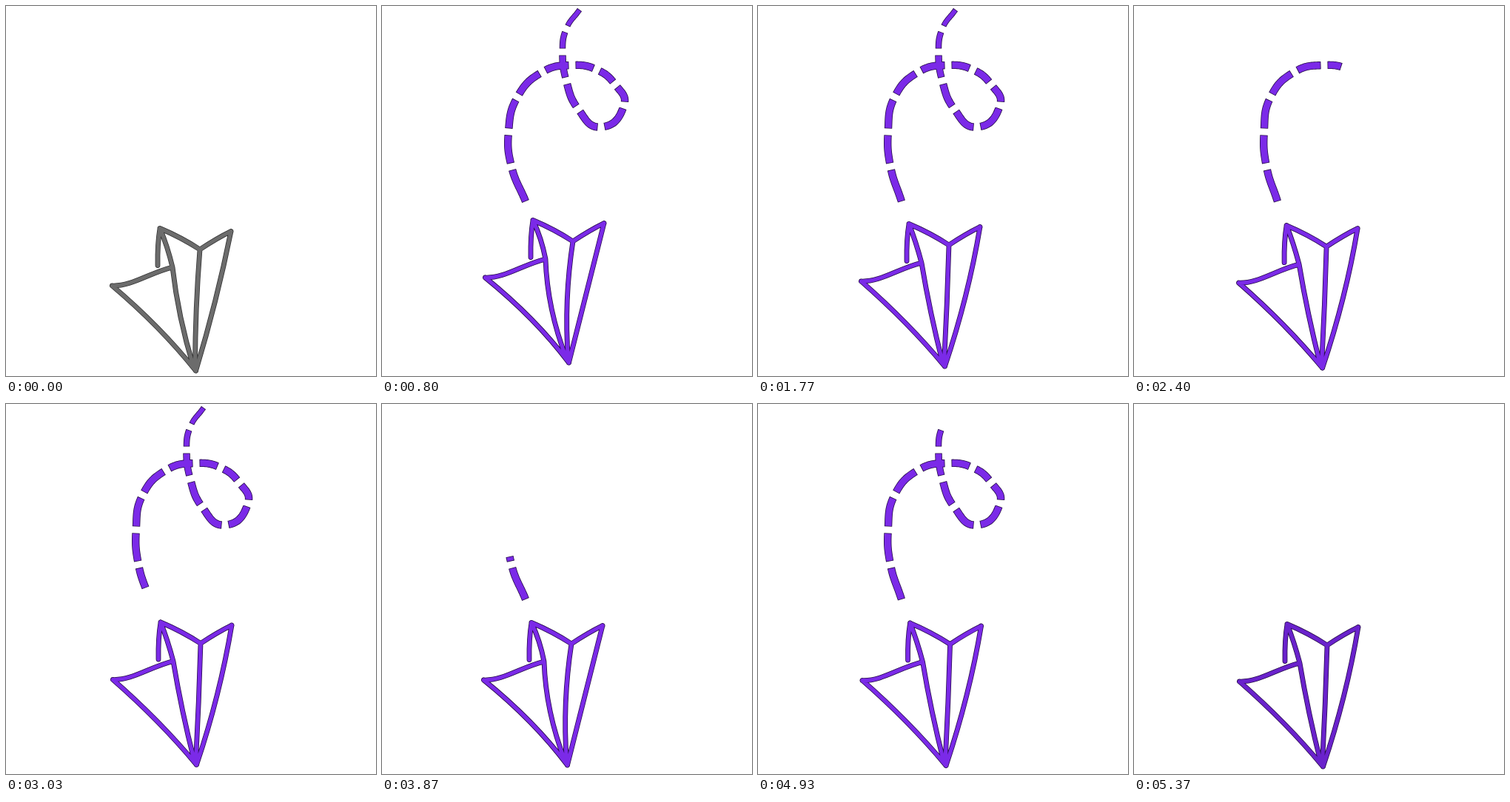
Write an HTML page with a canvas that moves like this. It is 500 px wide and 500 px high and loops after 5410 ms.

```html
<!DOCTYPE html>
<html lang="en">
<head>
<meta charset="utf-8">
<title>Paper plane</title>
<style>
html, body { margin: 0; height: 100%; overflow: hidden; background: #fff; }
canvas { display: block; width: 100vw; height: 100vh; object-fit: contain; }
</style>
</head>
<body>
<canvas id="stage" width="500" height="500"></canvas>
<script>
const ctx = document.getElementById('stage').getContext('2d');
const LOOP = 5410, CYCLE = 81, GAP = 9;
const PURPLE = '#7b2ae8', DIM = '#6a22cc', GREY = '#6c6c6c';

// Drift of the plane: frame, dx, dy, bend of its lines
const drift = [
  [0, 0, 0, .4], [10, 1, -5.5, 0], [24, -4, -11, 1],
  [35, -6, -5, 1], [53, -4, -6, 0], [80, -1, -3, 0], [CYCLE, 0, 0, .4]
];

const fold = [208, 300.5], flap = [205, 350.5], notch = [262, 329], right = [304, 304.5],
  nose = [256.5, 493], left = [143.5, 378], joint = [225, 353];

// The trail bends through these points; each inner one is the middle of a gap
const knots = [
  [267, 5], [249, 31], [244, 62], [249, 101], [265, 139], [296, 163.5], [327, 134], [315, 106],
  [290, 86], [257, 80], [217, 89], [183, 123], [171, 170], [175, 217], [194, 264]
];

const clamp = (x, lo = 0, hi = 1) => Math.min(hi, Math.max(lo, x));
const dist = (p, q) => Math.hypot(q[0] - p[0], q[1] - p[1]);

function driftAt(frame) {
  const i = drift.findIndex(d => d[0] > frame), a = drift[i - 1], b = drift[i];
  const u = (frame - a[0]) / (b[0] - a[0]);
  return a.map((v, j) => v + (b[j] - v) * u);
}

const edge = color => color === GREY ? '#333' : '#260c4a';

function stroke(path, width, color) {
  ctx.lineWidth = width;
  ctx.strokeStyle = color;
  ctx.stroke(path);
}

function plane(dx, dy, bend, color) {
  const path = new Path2D();
  const curve = (p, q, cx, cy) => {
    path.moveTo(...p);
    path.quadraticCurveTo((p[0] + q[0]) / 2 + cx, (p[1] + q[1]) / 2 + cy, ...q);
  };
  curve(flap, fold, -2, -4);
  curve(fold, notch, 2, -2);
  curve(notch, right, 2, -3);
  curve(right, nose, 8 - 8 * bend, 0);
  curve(left, nose, 7 + 5 * bend, -2);
  curve(fold, joint, 1 + 2 * bend, -2);
  curve(joint, [nose[0] - 3, nose[1] - 5], -3 - 9 * bend, 0);
  curve(notch, [nose[0] - 1, nose[1] - 5], 1 - 10 * bend, 0);
  path.moveTo(...left);
  path.bezierCurveTo(left[0] + 26, left[1] + 1, joint[0] - 32, joint[1] + 8, ...joint);
  ctx.save();
  ctx.translate(dx, dy);
  ctx.lineCap = ctx.lineJoin = 'round';
  stroke(path, 6.8, edge(color));
  stroke(path, 5.2, color);
  ctx.restore();
}

// Smooth segment between knots i and i + 1, as a path with its length
function segment(pts, i) {
  const p = pts[i], q = pts[i + 1], reach = dist(p, q) * 1.3 / 3;
  const handle = (k, sign) => {
    const a = pts[Math.max(k - 1, 0)], b = pts[Math.min(k + 1, pts.length - 1)], d = dist(a, b);
    return [0, 1].map(j => pts[k][j] + sign * reach * (b[j] - a[j]) / d);
  };
  const c = handle(i, 1), e = handle(i + 1, -1), path = new Path2D();
  let length = 0, last = p;
  path.moveTo(...p);
  for (let s = 1; s <= 24; s++) {
    const u = s / 24, v = 1 - u;
    const at = [0, 1].map(j => v ** 3 * p[j] + 3 * v * v * u * c[j] + 3 * v * u * u * e[j] + u ** 3 * q[j]);
    path.lineTo(...at);
    length += dist(last, at);
    last = at;
  }
  return { path, length };
}

function trail(from, to, sway, color) {
  const pts = knots.map(([x, y], i) => [i > 10 ? x + sway * Math.cos((y - 185) / 50) : x, y]);
  const parts = pts.slice(1).map((_, i) => segment(pts, i));
  const total = parts.reduce((sum, part) => sum + part.length, 0);
  let pos = 0;
  ctx.lineCap = 'butt';
  const dashes = parts.map(({ path, length }, i) => {
    const a = i ? GAP / 2 : 0, b = i < parts.length - 1 ? length - GAP / 2 : length;
    const start = clamp(from * total - pos, a, b), end = clamp(to * total - pos, a, b);
    pos += length;
    return { path, start, end, width: Math.min(10.4, 7.5 + i) };
  }).filter(d => d.end - d.start > 1);
  const layer = (inset, tint) => dashes.forEach(({ path, start, end, width }) => {
    ctx.setLineDash([0, start + inset, end - start - 2 * inset, 999]);
    stroke(path, width - 2 * inset, tint);
  });
  layer(0, edge(color));
  layer(.8, color);
  ctx.setLineDash([]);
}

function draw(now) {
  const step = Math.min(2 * CYCLE - 1, Math.floor((now % LOOP + 4) * .03));
  const frame = step % CYCLE, beat = frame % (CYCLE / 2);
  const from = clamp((beat - 26) / 10.1), to = clamp(beat / 10.3);
  const color = frame === 0 ? GREY : from === 1 ? DIM : PURPLE;
  const [, dx, dy, bend] = driftAt(frame);
  ctx.fillStyle = '#fff';
  ctx.fillRect(0, 0, 500, 500);
  trail(from, to, 5 * (1 - bend), color);
  plane(dx, dy, bend, color);
}

const start = performance.now();
function tick() {
  draw(performance.now() - start);
  requestAnimationFrame(tick);
}
tick();
</script>
</body>
</html>
```
